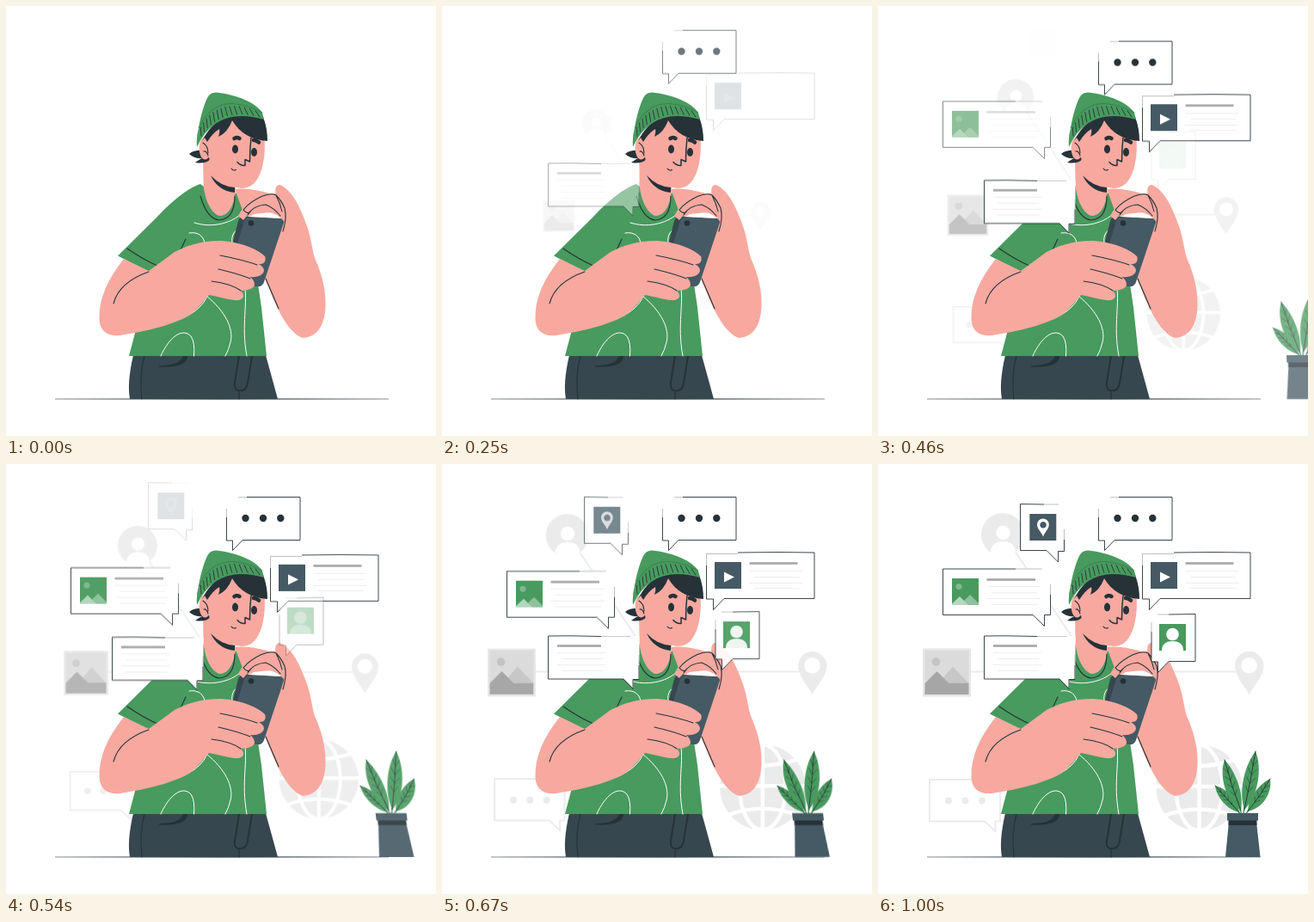
Recreate the animation shown at these times as an HTML page. Size 500x500 px, loop 1.04 s.

```html
<!DOCTYPE html>
<html lang="en">
<head>
<meta charset="utf-8">
<title>Messaging</title>
<style>
html, body { margin: 0; width: 100%; height: 100%; overflow: hidden; background: #fff; }
svg { display: block; width: 100%; height: 100%; }
.skin { fill: #f7a9a0; }
.green { fill: #489a5e; }
.ink { fill: #263238; }
.slate { fill: #455a64; }
.pants { fill: #37474f; }
.pale { fill: #ebebeb; }
.white { fill: #fff; }
.line { fill: none; stroke: #263238; stroke-width: 1.1; stroke-linecap: round; stroke-linejoin: round; }
.bold { stroke-width: 2; }
.trace { fill: none; stroke: #fff; stroke-width: 1; stroke-linecap: round; }
.wire { fill: none; stroke: #ebebeb; stroke-width: 2; }
.edge { fill: none; stroke: #263238; stroke-width: .9; stroke-linejoin: miter; }
.vein { stroke-width: .5; }
#ribs { stroke-width: .9; }
#icons { transform-origin: 248px 248px; }
#plant { transform-box: fill-box; transform-origin: center; }
</style>
</head>
<body>
<svg viewBox="0 0 500 500" xmlns="http://www.w3.org/2000/svg">
  <g id="icons">
    <path class="wire" d="M159 101L250 238M107 241.5H416"/>
    <circle class="pale" cx="145" cy="82" r="25"/>
    <circle class="white" cx="145.500" cy="80" r="8.300"/>
    <path class="white" d="M131 103C131 94 137 90 145.500 90C154 90 160 94 160 103Q154 107.500 145.500 107.500Q137 107.500 131 103Z"/>
    <path class="pale" fill-rule="evenodd" d="M431.500 268.500C427.500 259 415 248 415 234A16.800 17.500 0 0 1 448.500 234C448.500 248 435.500 259 431.500 268.500ZM431.500 225A9.300 9.300 0 1 0 431.600 225Z"/>
    <g>
      <rect x="52" y="214.500" width="56" height="56" fill="#e6e6e6"/>
      <rect x="54.500" y="217" width="51" height="51" fill="#dbdbdb"/>
      <circle cx="67.500" cy="230" r="4.800" fill="#c4c4c4"/>
      <path d="M71 254L87 235.500L104.500 254Z" fill="#c7c7c7"/>
      <path d="M54.500 255L68.500 241L82 254.500H105.500V268H54.500Z" fill="#a6a6a6"/>
    </g>
    <path class="wire" d="M60 367H142V415.500H136.500V427L124 415.500H60Z"/>
    <g class="pale">
      <circle cx="82" cy="391.500" r="4"/><circle cx="101.500" cy="391.500" r="4"/><circle cx="121" cy="391.500" r="4"/>
      <circle cx="373.500" cy="376.500" r="50"/>
    </g>
    <g fill="none" stroke="#fff" stroke-width="4.500">
      <path d="M373.500 326V427M323 375H424M333 344Q373 358 414 344M333 409Q373 394 414 409"/>
      <ellipse cx="373.500" cy="376.500" rx="27" ry="50"/>
    </g>
  </g>

  <path class="ink" stroke="#263238" stroke-width=".3" d="M57 457L251 456.400L445 457L251 457.400Z"/>

  <g id="person">
    <path class="pants" d="M148 406H302L316 457H144C142 445 142.500 430 148 406Z"/>
    <path class="line" d="M161 407C156 425 156 440 158 457M271 447V457"/>
    <path class="line bold" d="M271 407L266 438C265 447 270 448 275 447C281 445 281 438 282 432L286 407"/>
    <path class="ink" d="M178 418C190 418 203 416 206 407H211C211 417 198 420.500 178 419.500Z"/>

    <path class="green" d="M226 207C210 212 190 230 176 245L130 290.500L166 309L158 350L143 407H303L297 350L291 310L287 240L268 217L250 225Z"/>

    <path class="skin" d="M266 213C285 211 298 216 314 220C312 213 314 207 319 208C333 215 341 231 350 256C355 270 356 284 359 293C370 318 372 335 371.500 350C370 375 360 384.500 346 386C333 383 321 364 311 341L301 317L310 262L276 240Z"/>
    <path class="line" d="M302 317L317 352"/>

    <path class="skin" d="M229 172L229.500 205C230 226 240 243 249 244C260 243 266 230 267 213L268 195Z"/>
    <path class="line" d="M226 221C231 238 238 248 248 249C259 248 266 240 266 221"/>
    <path class="ink" d="M238 197Q250 210 266 211L266 217C253 216 243 208 238 197Z"/>

    <path class="ink" d="M213 172Q219 167 230 168L238 178Q232 184 220 182Q224 179 228 177Q219 178 213 172Z"/>
    <path class="skin" d="M234 148L258 128L300 148C303 172 299 212 274 212C258 210 244 200 237 185Z"/>
    <ellipse class="skin" cx="231.500" cy="165.500" rx="7" ry="13"/>
    <path class="line" d="M229 159Q235 163 235 171M230 169Q233 168 235 174"/>
    <path class="ink" d="M228 157C234 145 242 135 256 128Q280 120 299 129Q304 142 304 157Q276 155 263 133Q258 147 247 152Q249 146 248 143Q240 148 234 158L231 153Z"/>
    <path class="green" d="M224 142C226 128 231 113 234 107Q238 99 248 101C270 104 290 112 298 124L300 132Q244 116 222 164Q221 152 224 142Z"/>
    <path d="M224 142Q245 96 298 124" fill="none" stroke="#357a49" stroke-width=".8"/>
    <g id="ribs" class="line"></g>
    <ellipse class="ink" cx="266.500" cy="166.500" rx="3.500" ry="5"/>
    <ellipse class="ink" cx="288.500" cy="170" rx="3.500" ry="5"/>
    <path class="line" style="stroke-width:4.500" d="M265.500 154Q268 152 271.500 154M288 156Q291 156 294 158.500"/>
    <path class="line" style="stroke-width:1.500" d="M285 153Q283.500 166 283.500 181L278 178.500V185.500Q273 186 269 181.500"/>
    <path class="line" d="M262 189Q264 192 267.500 190.500"/>

    <path class="trace" d="M219 252C237 258 260 254 273 242M213 264C223 262 231 268 231 277M269 260C262 264 261 274 265 280M233 337C255 355 265 375 261 391Q259 400 255 407M277 322C282 345 273 370 280 407M180 407C189 386 205 373 215 384Q220 391 218.500 407M172 371C195 370 226 358 234 337"/>
    <path class="line" d="M141 282Q158 294 178 303M209 271L200 290"/>

    <path class="pants" d="M276 245H283L296 326L284 325L260 290L270 250Q272 245 276 245Z"/>
    <path class="slate" d="M277 250Q279 245 284 245L320 247Q324 248 323 252L300 321Q298 327 292 326H286L266 286Z"/>
    <circle class="ink" cx="285" cy="252.500" r="3.300"/>

    <path class="white" d="M281 244L290 239L308 240L318 244L320 247L283 245Z"/>
    <path class="skin" d="M270 244Q278 228 294 220L318 217L326 231L325 252L319 246Q311 239 302 240.500L288 242Q281 247 281 243L276 249Z"/>
    <path class="line" d="M276 237Q283 228 297 221.500Q308 217 314 220Q320 226 324 235Q327 246 322 262M281 243Q287 232 302 231Q312 235 319 244M276 237Q280 242 283 240M314 220Q319 230 321 239"/>

    <path class="skin" d="M137 294C118 318 108 340 108.500 364C109 380 121 386 138 382C170 377 198 369 214 359C226 350 229 343 236 336C248 338 263 343 271 342C278 340 277 335 273 331C282 331 289 328 289 324C289 320 287 318 284 315C294 316 299 312 300 308C300 304 297 302 294 300C301 301 303 295 301 291C294 284 277 275 250 273C225 273 210 279 196 286L166 308Z"/>
    <path class="line" d="M125 346C130 327 146 316 166 309M249 290Q275 295 292 301M247 306Q269 311 284 317M239 320Q262 323 273 331"/>
  </g>

  <g id="plant">
    <g id="leaves"></g>
    <path class="slate" d="M408 416H440L444.500 457H404Z"/>
    <rect class="ink" x="407.500" y="413" width="33" height="7"/>
    <rect class="slate" x="406" y="406" width="36" height="8.500"/>
  </g>

  <g id="video">
    <path class="white" d="M307 102.500H433V156.500H328L315.500 169V156.500H307Z"/>
    <path class="edge" d="M344 103L390 102.500L433 103V156.500H328L315.500 169.500V157H307.500V118"/>
    <path class="edge" opacity=".35" d="M307.500 118V104.500H344"/>
    <rect class="slate" x="317" y="114" width="31" height="31"/>
    <path class="white glyph" d="M328 125.500L340 131.500L328 137.500Z"/>
    <g class="glyph" data-text="357.500 115.500 56 124 131 138 144"></g>
  </g>
  <g id="dots">
    <path class="white" d="M256 38.500H342V88.500H275L263.500 100V88.500H256Z"/>
    <path class="edge" d="M280 38.500H342V88.500H275L263.500 100.500V89H256.500V62"/>
    <path class="edge" opacity=".35" d="M270 38.800H280M256.500 62V52"/>
    <g class="ink"><circle cx="278.500" cy="63" r="4.200"/><circle cx="299" cy="63" r="4.200"/><circle cx="319.300" cy="63" r="4.200"/></g>
  </g>
  <g id="photo">
    <path class="white" d="M75.500 121.500H201V175.500H194V188L180 175.500H75.500Z"/>
    <path class="edge" d="M160 122H75.500V175.500H180L193.500 188.500V175.500H200.500V152"/>
    <path class="edge" opacity=".35" d="M160 122H191M200.500 152V140"/>
    <rect class="green" x="86" y="133" width="31" height="31"/>
    <g class="glyph">
      <circle cx="94" cy="142.500" r="3.600" fill="#7fb88e"/>
      <path d="M95 164L107 152L117 162V164Z" fill="#8fc19c"/>
      <path d="M86 162.500L95 154L105 164H86Z" fill="#b5d7be"/>
    </g>
    <g class="glyph" data-text="126.500 134.500 56.500 142 149 156 163"></g>
  </g>
  <g id="note">
    <path class="white" d="M123.500 200H229.500V250H222.500V261L211 250H123.500Z"/>
    <path class="edge" d="M185 200.500L150 199.800L123.500 200V250H211L222 261.500V250.500H229V234"/>
    <path class="edge" opacity=".3" d="M185 200.500H219M229 234V222"/>
    <g data-text="134 211.500 51 219 226 233 240"></g>
  </g>
  <g id="place">
    <path class="white" d="M165.500 46.500H217V101H210V114L196 101H165.500Z"/>
    <path class="edge" d="M193 47L165.500 46.500V100.500H196L209.500 114V101.500H216.500V88"/>
    <path class="edge" opacity=".35" d="M193 47H210M216.500 88V76"/>
    <rect class="slate" x="176.300" y="58" width="31" height="31"/>
    <path class="white glyph" fill-rule="evenodd" d="M192 84.500C190 79 185 75.500 185 70.500A6.900 6.900 0 0 1 198.800 70.500C198.800 75.500 194 79 192 84.500ZM192 67A3.800 3.800 0 1 0 192.100 67Z"/>
  </g>
  <g id="friend">
    <path class="white" d="M318 174.500H369V229.500H338L325.500 242V229.500H318Z"/>
    <path class="edge" d="M338 175L369 174.500V229.500H338L325.500 242.500V230H318V195"/>
    <path class="edge" opacity=".35" d="M325 175H338M318 195V184"/>
    <rect class="green" x="327" y="186" width="31" height="31"/>
    <g class="white glyph">
      <circle cx="342.500" cy="198" r="7.300"/>
      <path d="M330 217C330 210 334 206 342.500 206C351 206 355 210 355 217Z"/>
    </g>
  </g>
</svg>
<script>
const $ = id => document.getElementById(id);
const add = (el, markup) => el.insertAdjacentHTML('beforeend', markup);
const quad = (a, b, c, u) => [0, 1].map(i =>
  (1 - u) ** 2 * a[i] + 2 * u * (1 - u) * b[i] + u * u * c[i]);

// Knitted ribs between the two edges of the hat band
for (let i = 0; i < 14; i++) {
  const u = .08 + i * .066;
  const top = quad([224, 142], [245, 96], [298, 124], u - .03);
  const low = quad([222, 164], [244, 118], [300, 132], u + .03);
  const at = f => top.map((v, j) => v + (low[j] - v) * f).join(' ');
  add($('ribs'), `<path d="M${at(.2)}L${at(.8)}"/>`);
}

// Leaf from base to tip with a midrib and side veins
function leaf(bx, by, tx, ty, width, bend) {
  const dx = tx - bx, dy = ty - by, len = Math.hypot(dx, dy);
  const nx = -dy / len, ny = dx / len;
  const at = (f, side) => [bx + dx * f + nx * side, by + dy * f + ny * side];
  const ctrl = at(.5, bend);
  let veins = '';
  for (let f = .3; f < .8; f += .15) {
    const mid = quad([bx, by], ctrl, [tx, ty], f);
    for (const s of [-1, 1]) {
      const reach = s * width * .4 * Math.sin(f * Math.PI);
      veins += `M${mid}l${nx * reach + dx * .1} ${ny * reach + dy * .1}`;
    }
  }
  add($('leaves'), `<path class="green" d="M${bx} ${by}C${at(.3, bend + width)} ${at(.75, bend + width * .8)} ${tx} ${ty}C${at(.75, bend - width * .8)} ${at(.3, bend - width)} ${bx} ${by}Z"/>
    <path class="line vein" d="${veins}"/>
    <path class="line" style="stroke-width:.9" d="M${bx} ${by}Q${ctrl} ${tx} ${ty}"/>`);
}
add($('leaves'), '<path d="M421 407L417 401M423 407L420 400M425 407L426 398M428 407L432 400" fill="none" stroke="#489a5e" stroke-width="1.500"/>');
leaf(420, 405, 392, 374, 9, 0);
leaf(422, 403, 403, 344, 12, -2);
leaf(430, 404, 456, 366, 11, 2);
leaf(426, 402, 439, 334, 12.5, 1);

// Heading bar with faint lines of copy below
document.querySelectorAll('[data-text]').forEach(el => {
  const [x, y, w, ...rows] = el.dataset.text.split(' ').map(Number);
  add(el, `<rect x="${x}" y="${y - 1.3}" width="${w}" height="2.600" fill="#a6a6a6"/>`);
  rows.forEach((row, i) => add(el,
    `<rect x="${x + 5 * (i % 2)}" y="${row}" width="${w * (i % 2 ? .95 : 1.1)}" height=".5" fill="#dcdcdc"/>`));
});

const anims = [];
function move(el, frames, delay, duration, easing = 'linear') {
  const a = el.animate(frames, { delay, duration, easing, fill: 'both' });
  a.pause();
  anims.push(a);
}

// Each bubble drops in; its contents fade in on top of that
const starts = { dots: 40, note: 88, video: 150, photo: 255, friend: 396, place: 442 };
const drop = 'cubic-bezier(.36, 0, .5, 1.48)';
for (const id in starts) {
  move($(id), [
    { opacity: 0, transform: 'translateY(-30px)' },
    { opacity: 1, transform: 'translateY(0px)' }
  ], starts[id], 480, drop);
  $(id).querySelectorAll('.glyph').forEach(el =>
    move(el, [{ opacity: 0 }, { opacity: 1 }], starts[id], 480, drop));
}
move($('icons'), [
  { opacity: 0, transform: 'scale(.57)' },
  { opacity: 1, transform: 'scale(1)' }
], 0, 1000, 'cubic-bezier(.36, -.01, .5, 1.38)');

const plantSteps = [
  [0, 150, -20, 0], [.38, 112, -1, .6], [.54, 23, 7, .9],
  [.6, 0, 10, 1], [.8, 0, -2, 1], [1, 0, 0, 1]
];
move($('plant'), plantSteps.map(([offset, x, skew, opacity]) => (
  { offset, opacity, transform: `translateX(${x}px) skewX(${skew}deg)` }
)), 0, 1000);

const LOOP = 1040, FPS = 24, begin = performance.now();
function draw() {
  const t = (performance.now() - begin) % LOOP;
  const step = Math.floor((t + 5) * FPS / 1000);
  anims.forEach(a => { a.currentTime = step * 1000 / FPS; });
  requestAnimationFrame(draw);
}
draw();
</script>
</body>
</html>
```
